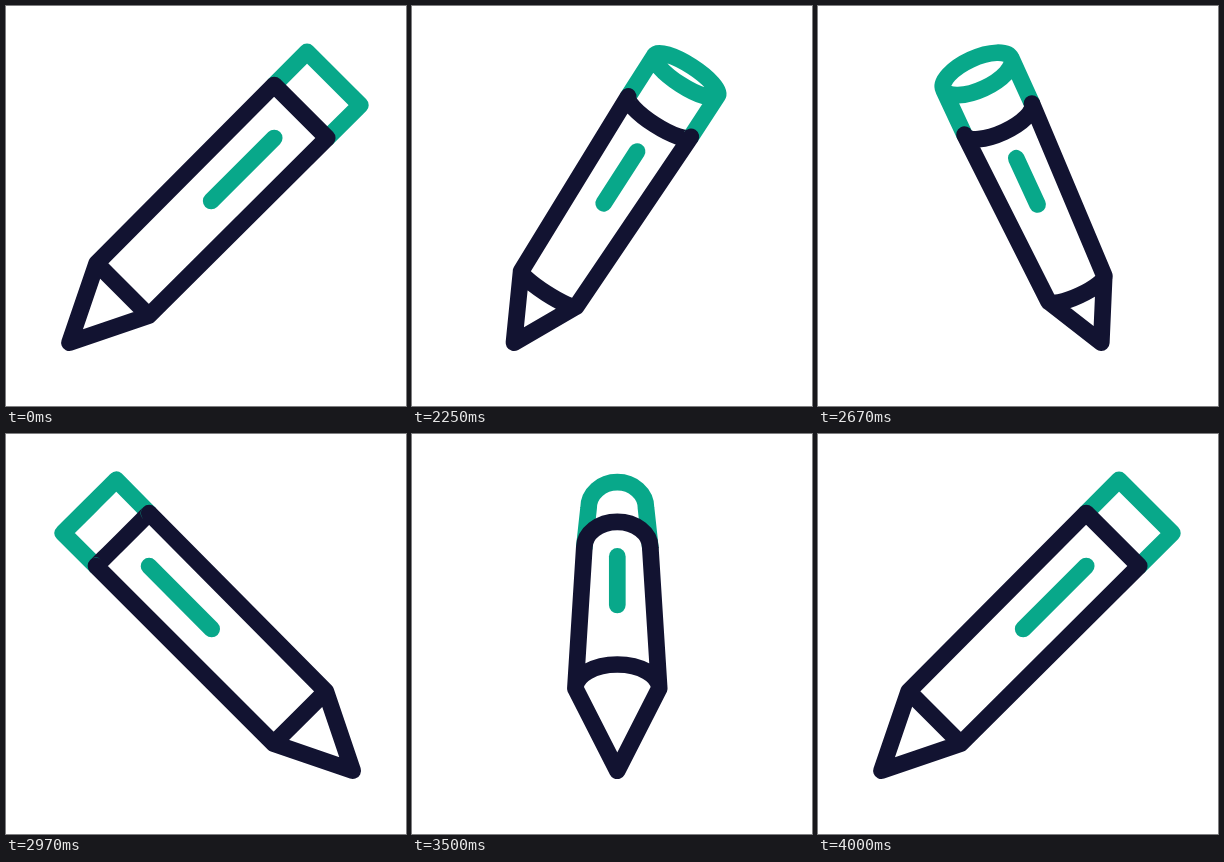
These frames come from a looping animation (400x400 px, 4.02 s). An HTML page:

```html
<!DOCTYPE html>
<html lang="en">
<head>
<meta charset="utf-8">
<title>Turning pencil</title>
<style>
  html, body { margin: 0; width: 100%; height: 100%; overflow: hidden; background: #fff; }
  svg { display: block; width: 100vw; height: 100vh; }
  path { fill: none; stroke-width: 16.7; stroke-linecap: round; stroke-linejoin: round; }
  .green { stroke: #08a88a; }
  .navy { stroke: #121331; }
</style>
</head>
<body>
<svg viewBox="0 0 400 400">
  <g id="pencil">
    <path id="eraser" class="green"/>
    <path id="body" class="navy"/>
    <path id="shine" class="green"/>
  </g>
</svg>
<script>
const LOOP = 4020, HOLD = 2000, TURN = 2000, STEP = 25;
const AXIS_X = 205.3, SWING = 141.8, TIP_Y = 336.7;
const el = id => document.getElementById(id);
const fixed = n => n.toFixed(2);

// Each ring: [rest, change with the top in front, change with the tip in front]
const RINGS = {
  collar: { height: [53.2, 1.5, 29], radius: [36.9, -8.8, 5], sag: [0, 11, 24] },
  rim:    { height: [231.2, -11, -8], radius: [37.5, -0.5, -4.5], sag: [0, 20, 25.7] },
  cap:    { height: [264.2, 6.5, -1.4], radius: [37.7, -0.5, -9], sag: [0, 22.7, 25.7] }
};
const SHINE = { top: [204.7, -29, 9.6], bottom: [141.7, -5, 24] };

// Signed lean: 1 is fully right, -1 fully left
function leanAt(phase) {
  const x = Math.abs(1 - 2 * phase) * 2 - 1;
  const d = Math.abs(x);
  return Math.sign(x) * (Math.sin(d * Math.PI / 2) + d * (2 - d)) / 2;
}

function draw(time) {
  const stepped = Math.floor((time % LOOP + 5) / STEP) * STEP;
  const phase = Math.min(1, Math.max(0, (stepped - HOLD) / TURN));
  const topInFront = phase < 0.5;
  const lean = leanAt(phase);
  const tilt = 45 * lean;
  const depth = 1 - lean * lean;
  const stretch = 1 / Math.cos(tilt * Math.PI / 180);

  const mix = ([rest, front, back]) => rest + (topInFront ? front : back) * depth;
  const along = height => fixed(-mix(height) * stretch);
  const ring = ({ height, radius, sag }) => {
    const r = mix(radius), y = along(height);
    const left = `${fixed(-r)} ${y}`, right = `${fixed(r)} ${y}`;
    const arc = (sweep, end) => `A${fixed(r)} ${fixed(mix(sag))} 0 0 ${sweep} ${end}`;
    return { left, right, near: arc(topInFront ? 0 : 1, right), far: arc(0, left) };
  };

  const collar = ring(RINGS.collar), rim = ring(RINGS.rim), cap = ring(RINGS.cap);
  el("pencil").setAttribute("transform",
    `translate(${fixed(AXIS_X - SWING * lean)} ${TIP_Y}) rotate(${fixed(tilt)})`);
  el("eraser").setAttribute("d",
    `M${rim.left}L${cap.left}${cap.near}L${rim.right}` +
    (topInFront ? `M${cap.right}${cap.far}` : ""));
  el("body").setAttribute("d",
    `M0 0L${collar.left}L${rim.left}${rim.near}L${collar.right}Z` +
    `M${collar.left}${collar.near}`);
  el("shine").setAttribute("d", `M0 ${along(SHINE.top)}V${along(SHINE.bottom)}`);
}

const start = performance.now();
function tick() {
  draw(performance.now() - start);
  requestAnimationFrame(tick);
}
tick();
</script>
</body>
</html>
```
